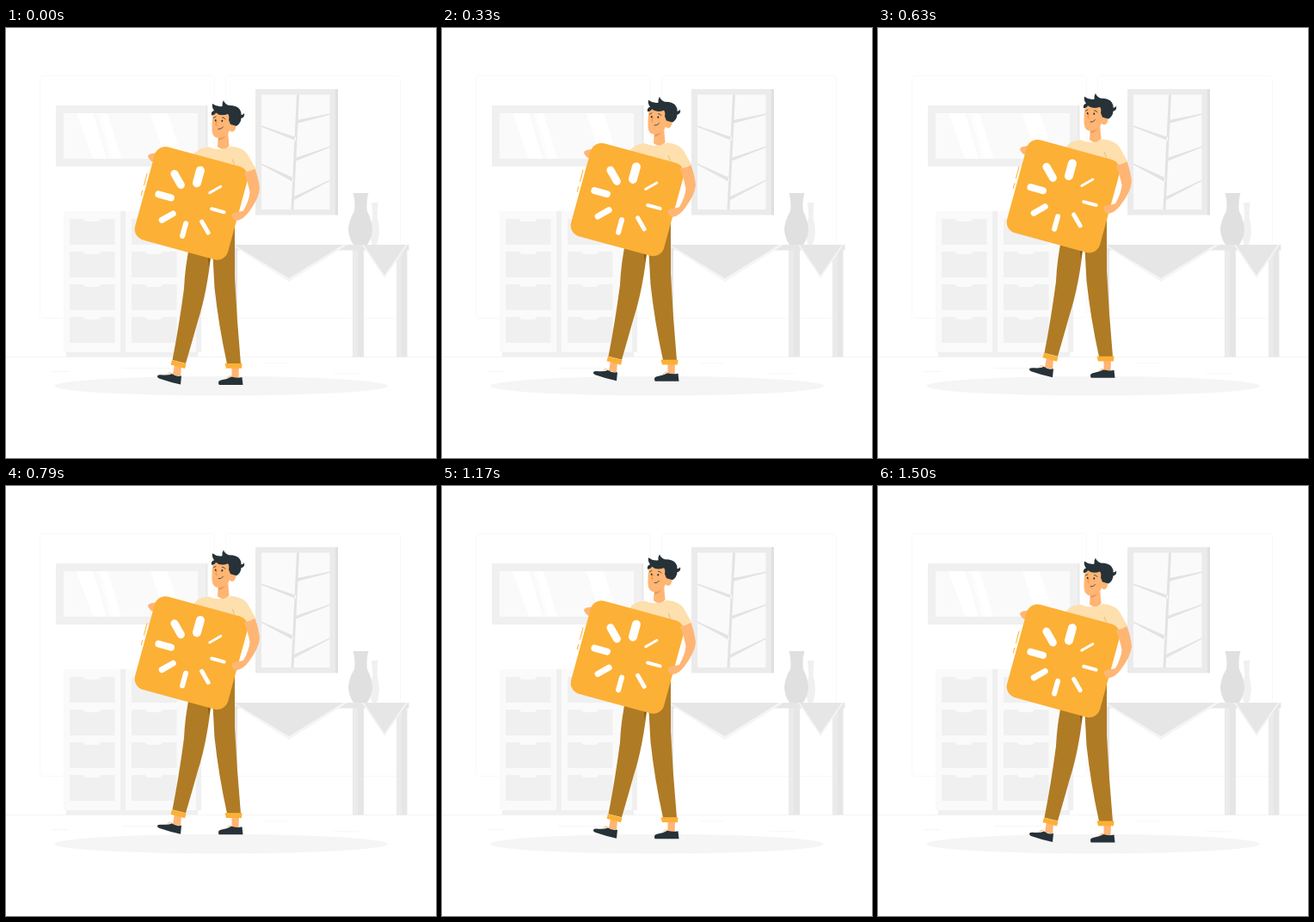
Write an HTML page that moves like this. It is 500 px wide and 500 px high and loops after 1540 ms.

```html
<!DOCTYPE html>
<html lang="en">
<head>
<meta charset="utf-8">
<title>Carrying the loader</title>
<style>
  html, body { margin: 0; width: 100%; height: 100%; overflow: hidden; background: #fff; }
  svg { display: block; width: 100vw; height: 100vh; }
  .line { fill: none; stroke-linecap: round; }
</style>
</head>
<body>
<svg viewBox="0 0 500 500">
  <defs>
    <path id="drawer" fill="#f0f0f0" d="M0 0H16Q17 3 20 3H32Q35 3 36 0H52.500V30H0Z"/>
  </defs>

  <!-- Walls and floor -->
  <g fill="none" stroke="#f7f7f7" stroke-width=".8">
    <rect x="39.500" y="55.500" width="203" height="282" rx="4"/>
    <rect x="255.500" y="55.500" width="203" height="282" rx="4"/>
    <path stroke="#ebebeb" stroke-width=".6" d="M0 382.400H500"/>
    <path stroke="#f0f0f0" stroke-width=".6" d="M300 389.800H328M53 399.500H73M135 395.500H190M381 401.800H410"/>
  </g>

  <!-- Wide picture -->
  <path fill="#f0f0f0" d="M58 90H234V161H58Z"/>
  <path fill="#e8e8e8" d="M232.500 90H234.500V161H232.500Z"/>
  <path fill="#fafafa" d="M67 99H223V152H67Z"/>
  <path fill="#fff" d="M82 99H101L117 152H101ZM107 99H108.500L123 152H121.500ZM109.500 99H118L134 152H124ZM168 99H188L205 152H185Z"/>

  <!-- Tall picture -->
  <path fill="#ebebeb" d="M290 71H384V217.500H290Z"/>
  <path fill="#e0e0e0" d="M383 71H386V217.500H383Z"/>
  <path fill="#fafafa" d="M297 77.500H376.500V211H297Z"/>
  <path fill="#e3e3e3" d="M338 77.500H341L334.500 211H331.500ZM339 107L376.500 99.500V101L338 111ZM337 127L297 113.500V115L337 131ZM337 151L376.500 137.500V139L336 155ZM334 174L297 157.500V159L334 179ZM335 196L376.500 176.500V178L333 201Z"/>

  <!-- Cabinet -->
  <path fill="#f0f0f0" d="M70 376H223V382.400H70ZM221 213H227V377H221Z"/>
  <path fill="#fafafa" d="M67 213H221V377H67Z"/>
  <path fill="#f0f0f0" d="M133 213H139V377H133Z"/>
  <g id="drawers"></g>

  <!-- Table and vases -->
  <path fill="#f0f0f0" d="M264 258H267V382.400H264ZM403 258H410V382.400H403ZM454 258H460V382.400H454Z"/>
  <path fill="#e6e6e6" d="M266 258H269V382.400H266ZM403 258H416V382.400H403ZM454 258H466.500V382.400H454ZM264 252H468.500V258.500H264Z"/>
  <path fill="#ebebeb" d="M403 258.500H409V382.400H403ZM454 258.500H460V382.400H454Z"/>
  <path fill="#f5f5f5" d="M262 252H397L329 295ZM414 252H467L440 291Z"/>
  <path fill="#e6e6e6" d="M265 252H392L329 291ZM416 252H465L440 287.500Z"/>
  <path fill="#f0f0f0" d="M425 203H432.500L431.500 220Q434 228 434 238Q433 247 431 252H426Q423 246 423 237Q424 228 426.500 220Z"/>
  <path fill="#e0e0e0" d="M403.500 192H421.500Q418.500 202 420 213Q426 225 426 235Q425 245 420 252H404Q399 245 398 235Q398.500 224 405 213Q406.500 202 403.500 192Z"/>

  <ellipse cx="250" cy="416.200" rx="193.900" ry="11.300" fill="#f5f5f5"/>

  <g id="carrier">
    <!-- Feet -->
    <g fill="#ffb573">
      <path d="M196 391L204 393L203 405L194 403ZM262.500 394H271L270.500 408H262.500Z"/>
    </g>
    <g fill="#263238">
      <path d="M176 404.500Q177 403 182 403.500Q189 404 193 402Q198 406 204 404.500L203 414.500Q191 412 178 407.500Q175.500 406.500 176 404.500Z"/>
      <path d="M247 412Q247 410 252 409Q258 408 262 405.500Q268 407.500 274.500 406L275.500 415H248Q247 415 247 412Z"/>
    </g>
    <path class="line" stroke="#ffb573" stroke-width="1" d="M188 402.500Q190 399 193 402M257 407Q259 403.500 262 405"/>

    <!-- Trousers -->
    <g fill="#b07b25">
      <path d="M214 250L239 258Q234 307 223 341Q216 366 209 390L193.500 386Q201 348 207 303Q208 278 214 250Z"/>
      <path d="M240 255L266 215V290Q268.500 340 273 390.500H257Q247 345 242.500 302Q241 276 240 255Z"/>
    </g>
    <path fill="#875e1a" d="M234 261L238.500 262L236 277Z"/>
    <g fill="#fcb035">
      <path d="M193 386L209.500 390.500L208 396L191.500 391.500Z"/>
      <path d="M254.500 390H274.500L274 395.800H256Z"/>
    </g>

    <!-- Body and head -->
    <path fill="#fedfae" d="M217 149Q222 139 236 138.500Q249 144 262 137.500Q276 139 281 147L290 163Q284 168 275 168L268 225H222Z"/>
    <path fill="#ffb573" d="M247 122L258 120L259.500 137.500Q252 144 246 138Z"/>
    <path fill="#e89a5c" d="M247 127Q253 126 257 121Q256 128 247.500 131Z"/>
    <path fill="#ffb573" d="M241 98H260L262 113Q262 109 266 111.500Q269 116 265 120Q262 122 260 119Q257 127 248 128Q240 128 239.500 119Q239 108 241 98Z"/>
    <path fill="#263238" d="M239 101.500Q238 97 242 96Q239 92 240 88Q245 92 251.500 91Q251 87 253 84Q254 88 259 90Q269 90 272 95Q274 98 273.500 101Q276 101 277 99Q278 104 273.500 105Q273 111 268 114L261 112L259 107Q260 102 258 100Q249 103 244 98.500Q243 101 239 101.500Z"/>
    <g fill="#263238">
      <ellipse cx="243.700" cy="107.500" rx=".9" ry="1.300"/>
      <ellipse cx="251.300" cy="108" rx=".9" ry="1.300"/>
    </g>
    <path class="line" stroke="#263238" stroke-width=".8" d="M241.500 104.500L244 103.200M251.500 104Q254 104 255 106M247 117.500Q251 118 252.500 115"/>
    <path class="line" stroke="#ed893e" stroke-width="1" d="M245.500 108.500Q242.500 112.500 245 113.500"/>
    <path class="line" stroke="#e0ad60" stroke-width=".7" d="M263.500 153Q264 156 265.500 158.500"/>

    <!-- Far hand and card -->
    <path fill="#ffb573" d="M165 148.500Q167 145.500 170 146L177 144.500L173 156L169 155Q165 151 165 148.500Z"/>
    <g transform="translate(215.500 203.800) rotate(15.300)">
      <rect x="-56" y="-56" width="112" height="112" rx="13" fill="#fcb035"/>
      <g id="rays" stroke="#fff" stroke-linecap="round"></g>
    </g>
    <path class="line" stroke="#fcb035" stroke-width="1" d="M164 169.500L160.500 183M158.800 189L157.200 194.500"/>

    <!-- Near arm -->
    <path fill="#ffb573" d="M276.500 168Q284 167 289.500 163.500Q294 176 295 187Q294 198 283 213Q276 223 268 224Q263 224 262.500 217Q264 213.500 270 214L276 212.500Q283 200 283.500 191Q281 178 276.500 168Z"/>
  </g>
</svg>
<script>
  const LOOP = 1540, LIFT = 10;
  const byId = id => document.getElementById(id);
  const repeat = (count, draw) => Array.from({ length: count }, (_, i) => draw(i)).join('');

  byId('drawers').innerHTML = repeat(8, i =>
    `<use href="#drawer" x="${i % 2 ? 146 : 74}" y="${222 + 38 * (i >> 1)}"/>`);
  byId('rays').innerHTML = repeat(8, i =>
    `<path d="M0-39.500V-24.500" stroke-width="${10 - i}" transform="rotate(${-45 * i})"/>`);

  const carrier = byId('carrier');
  function tick() {
    const phase = performance.now() % LOOP / LOOP;
    const rise = LIFT * (1 - Math.abs(1 - 2 * phase));
    carrier.setAttribute('transform', `translate(0 ${-rise})`);
    requestAnimationFrame(tick);
  }
  tick();
</script>
</body>
</html>
```
